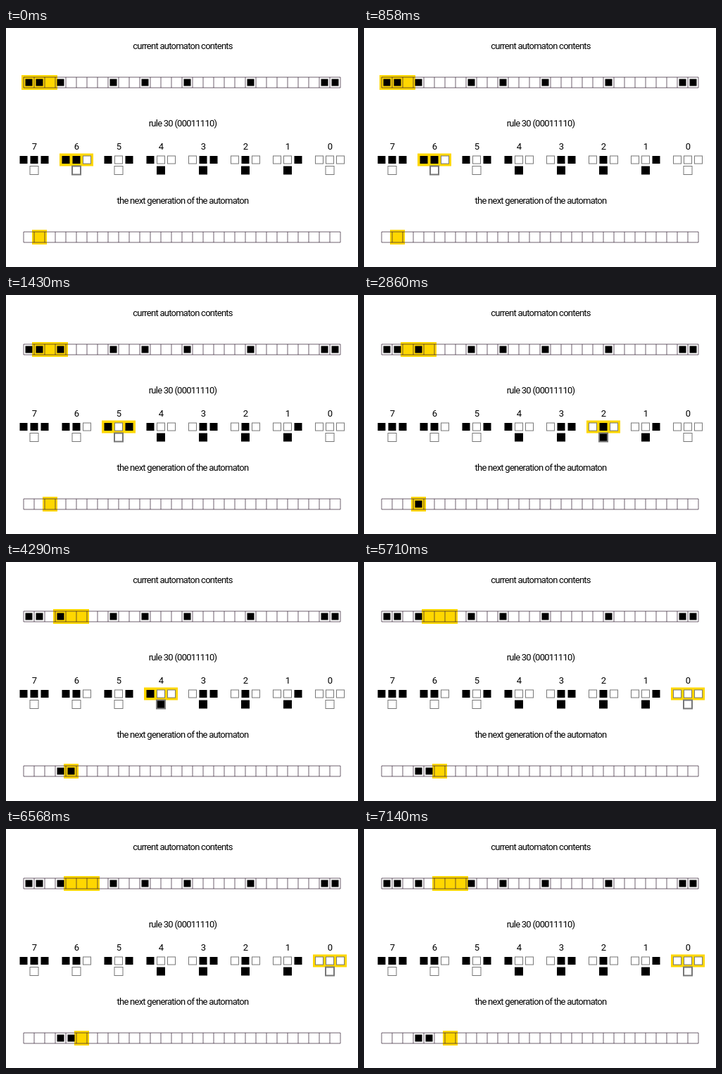
Write an HTML page with a canvas that moves like this. It is 500 px wide and 340 px high and loops after 8 s.

```html
<!DOCTYPE html>
<html lang="en">
<head>
<meta charset="utf-8">
<title>Elementary cellular automaton</title>
<style>
  html, body { margin: 0; width: 100%; height: 100%; overflow: hidden; background: #fff; }
  canvas { display: block; }
</style>
</head>
<body>
<canvas id="stage" width="500" height="340"></canvas>
<script>
const ctx = document.getElementById('stage').getContext('2d');
const LOOP = 8000;
const STEP_STARTS = [0, 1430, 2860, 4290, 5710, 7140];
const RULE = 30;
const CELLS = 30, SIZE = 15, LEFT = 25;
const CURRENT_Y = 70, RULE_Y = 187.5, NEXT_Y = 290;
const GOLD = '#ffd700';
const alive = new Set([0, 1, 3, 8, 11, 15, 21, 28, 29]);

const patternAt = i => [i - 1, i, i + 1].reduce((bits, n) => bits * 2 + alive.has(n), 0);
const outputOf = pattern => RULE >> pattern & 1;

function fill(color, x, y, w, h) {
  ctx.fillStyle = color;
  ctx.fillRect(x, y, w, h);
}

function label(text, x, y) {
  ctx.fillStyle = '#000';
  ctx.fillText(text, x, y);
}

function drawRow(y, first, count, isAlive) {
  fill(GOLD, LEFT + first * SIZE - 3, y - 3, count * SIZE + 6, 21);
  ctx.strokeStyle = 'rgba(50, 30, 50, .7)';
  ctx.lineWidth = 1;
  ctx.beginPath();
  ctx.rect(LEFT, y, CELLS * SIZE, SIZE);
  for (let i = 1; i < CELLS; i++) {
    ctx.moveTo(LEFT + i * SIZE, y);
    ctx.lineTo(LEFT + i * SIZE, y + SIZE);
  }
  ctx.stroke();
  for (let i = 0; i < CELLS; i++) {
    if (isAlive(i)) fill('#000', LEFT + i * SIZE + 2.5, y + 2.5, 10, 10);
  }
}

function drawSquare(x, y, side, on, lineWidth = 1) {
  const box = [x - side / 2, y - side / 2, side, side];
  fill(on ? '#000' : '#fff', ...box);
  if (on && lineWidth === 1) return;
  ctx.strokeStyle = '#777';
  ctx.lineWidth = lineWidth;
  ctx.strokeRect(...box);
}

function drawRule(pattern, active) {
  const x = 40 + (7 - pattern) * 60;
  label(pattern, x, 173);
  if (active) fill(GOLD, x - 24, RULE_Y - 9, 48, 18);
  for (let i = 0; i < 3; i++) drawSquare(x + (i - 1) * SIZE, RULE_Y, 11, pattern >> (2 - i) & 1);
  drawSquare(x, RULE_Y + SIZE, 12, outputOf(pattern), active ? 2 : 1);
}

function draw(now) {
  const time = now % LOOP;
  const step = STEP_STARTS.filter(start => start <= time).length - 1;
  const center = step + 1;

  fill('#fff', 0, 0, 500, 340);
  ctx.font = '13px Roboto, sans-serif';
  ctx.letterSpacing = '-0.75px';
  ctx.textAlign = 'center';
  label('current automaton contents', 251, 30);
  label('rule 30 (00011110)', 251, 140);
  label('the next generation of the automaton', 251, 250);

  drawRow(CURRENT_Y, step, 3, i => alive.has(i));
  for (let pattern = 7; pattern >= 0; pattern--) drawRule(pattern, pattern === patternAt(center));
  drawRow(NEXT_Y, center, 1, i => i > 0 && i <= center && outputOf(patternAt(i)));
  requestAnimationFrame(draw);
}

requestAnimationFrame(draw);
</script>
</body>
</html>
```
